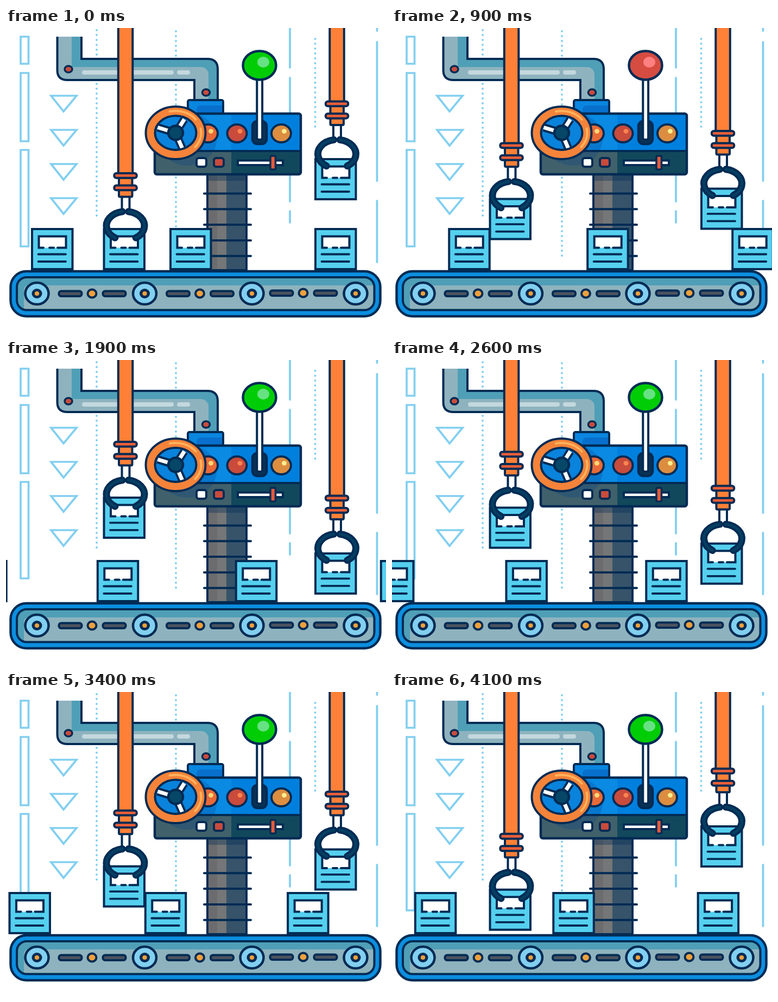
An HTML page with a canvas that plays this animation: 700 by 561 pixels, repeating every 4200 ms.

```html
<!DOCTYPE html>
<html lang="en">
<head>
<meta charset="utf-8">
<title>Conveyor machine</title>
<style>
html, body { margin: 0; width: 100%; height: 100%; overflow: hidden; background: #fff; }
canvas { display: block; }
</style>
</head>
<body>
<canvas id="stage" width="700" height="561"></canvas>
<script>
const ctx = document.getElementById('stage').getContext('2d');
const NAVY = '#012b54', SKY = '#82cff0', TEAL = '#4f9fb7', STEEL = '#8eb3be';
const ORANGE = '#ff8036', RED = '#c94b3c', BLUE = '#0080de', AMBER = '#f0a03c';
const LOOP = 4200, STEP = 100, HALF = 21;

function paint(fill, stroke, width = 4) {
  if (fill) { ctx.fillStyle = fill; ctx.fill(); }
  if (stroke) { ctx.strokeStyle = stroke; ctx.lineWidth = width; ctx.stroke(); }
}
function box(x, y, w, h, r, fill, stroke, width) {
  ctx.beginPath();
  ctx.roundRect(x, y, w, h, r);
  paint(fill, stroke, width);
}
function oval(x, y, rx, ry, fill, stroke, width) {
  ctx.beginPath();
  ctx.ellipse(x, y, rx, ry, 0, 0, Math.PI * 2);
  paint(fill, stroke, width);
}
function line(x1, y1, x2, y2, color, width, cap = 'round') {
  ctx.beginPath();
  ctx.moveTo(x1, y1);
  ctx.lineTo(x2, y2);
  ctx.lineCap = cap;
  paint(null, color, width);
}
function arc(x, y, rx, ry, from, to, color, width) {
  ctx.beginPath();
  ctx.ellipse(x, y, rx, ry, 0, from, to);
  ctx.lineCap = 'round';
  paint(null, color, width);
}

function drawBackdrop() {
  ctx.fillStyle = '#fff';
  ctx.fillRect(0, 0, 700, 561);
  for (const [y, h] of [[16, 50], [83, 126], [225, 178]]) box(27, y, 14.5, h, 0, null, SKY, 3.7);
  for (let y = 125; y < 320; y += 63) {
    ctx.beginPath();
    ctx.moveTo(83, y);
    ctx.lineTo(130, y);
    ctx.lineTo(106, y + 29);
    ctx.closePath();
    paint(null, SKY, 3.7);
  }
  for (const [x, top, bottom] of [[167, 4, 347], [313, 6, 424], [569.5, 20, 183]]) {
    for (let y = top; y < bottom; y += 9) oval(x, y, 2, 2, SKY);
  }
  for (const [x, a, b] of [[523, 0, 73], [523, 92, 320], [523, 338, 359],
    [683.5, 0, 5], [683.5, 26, 282], [683.5, 319, 432]]) line(x, a, x, b, SKY, 3.8);
}

function pipePath() {
  ctx.beginPath();
  ctx.moveTo(94.5, 16);
  ctx.lineTo(94.5, 78);
  ctx.quadraticCurveTo(94.5, 96, 113, 96);
  ctx.lineTo(347, 96);
  ctx.lineTo(347, 134);
  ctx.lineTo(390, 134);
  ctx.lineTo(390, 76);
  ctx.quadraticCurveTo(390, 57, 371, 57);
  ctx.lineTo(139, 57);
  ctx.lineTo(139, 16);
}

function drawPipe() {
  ctx.save();
  pipePath();
  ctx.clip();
  ctx.fillStyle = TEAL;
  ctx.fillRect(90, 10, 304, 130);
  box(90, 10, 31, 100, 0, STEEL);
  box(90, 72, 283, 80, [0, 14, 0, 0], STEEL);
  ctx.restore();
  pipePath();
  ctx.lineCap = 'butt';
  paint(null, NAVY, 4);
  line(144, 82, 305, 82, '#c3d8de', 8);
  line(319, 82, 335, 82, '#c3d8de', 8);
  oval(115, 76, 7, 6, RED, NAVY, 3.5);
  oval(368.5, 119, 7, 6, RED, NAVY, 3.5);
}

function drawPost() {
  box(371, 268, 72, 179, 0, '#6c6c6e');
  box(389, 268, 17, 179, 0, '#747677');
  box(406, 268, 37, 179, 0, '#36536a');
  box(371, 268, 72, 14, 0, 'rgba(1,43,84,.35)');
  box(371, 268, 72, 179, 0, null, NAVY);
  for (let i = 0; i < 5; i++) line(365, 305.5 + 28.8 * i, 451, 305.5 + 28.8 * i, NAVY, 4);
}

function lamp(x, color, glow) {
  oval(x, 194.5, 18, 16.5, color, NAVY, 4);
  oval(x + 5.5, 190.5, 4.5, 4.2, glow);
}

function drawPanel() {
  box(335, 133, 65, 27, 3, '#0a86e0');
  box(351, 143, 49, 17, [8, 0, 0, 0], '#0870cc');
  box(335, 133, 65, 27, 3, null, NAVY);

  box(274, 158, 269, 112, 4, BLUE);
  box(274, 158, 141, 70, 0, '#0a8ae2');
  box(274, 227, 269, 43, [0, 0, 4, 4], '#12485c');
  box(274, 227, 141, 43, [0, 0, 0, 4], '#40616b');
  ctx.save();
  ctx.beginPath();
  ctx.rect(274, 158, 269, 112);
  ctx.clip();
  oval(334, 205, 54, 49, 'rgba(0,60,140,.25)');
  ctx.restore();
  box(274, 158, 269, 112, 4, null, NAVY, 4.5);
  line(274, 227, 543, 227, NAVY, 4);

  lamp(372, '#e96a38', '#ffd873');
  lamp(425.5, RED, '#ff8450');
  lamp(507, '#dc8d40', '#fff08c');

  box(351, 240, 18, 16, 4, '#fff', NAVY);
  box(383, 240, 18, 16, 4, RED, NAVY);
  box(427, 244.5, 83, 8.5, 0, '#fff', NAVY);
  box(487, 236, 9.5, 25, 2, '#e25a3c', NAVY, 3.5);
}

function drawLever(red) {
  box(454, 172, 26, 42, 9, '#0a3252', NAVY, 4.5);
  box(462.3, 92, 9.8, 114, 3, '#fff', NAVY, 4);
  oval(467, 69, 30.5, 26.5, red ? '#d64c41' : '#00cd05', NAVY, 4.5);
  oval(474, 63, 11, 10, red ? '#ff8080' : '#66e183');
}

function drawWheel() {
  const x = 312.5, y = 193.5;
  oval(x, y, 38, 32, '#0a83dc');
  for (const [dx, dy] of [[-33, -10], [16, -25], [12, 28]]) {
    line(x, y, x + dx, y + dy, NAVY, 15, 'butt');
    line(x, y, x + dx, y + dy, '#fff', 7, 'butt');
  }
  oval(x, y, 46.5, 40, null, NAVY, 21);
  oval(x, y, 46.5, 40, null, '#f5833a', 13);
  arc(x, y, 47, 40.5, -1.8, -0.65, '#ffb35c', 4);
  arc(x, y, 47, 40.5, -0.2, 0.7, '#ffb35c', 4);
  oval(x, y, 13.5, 13, '#064768', NAVY, 4.5);
}

function drawBelt() {
  box(8.5, 449, 681, 83, 29, '#0c8fe0', NAVY, 4.5);
  ctx.save();
  ctx.beginPath();
  ctx.roundRect(20, 460, 658.5, 60.5, 18);
  ctx.clip();
  ctx.fillStyle = TEAL;
  ctx.fillRect(20, 460, 660, 61);
  box(33, 475, 660, 60, [8, 0, 0, 0], STEEL);
  ctx.restore();
  box(20, 460, 658.5, 60.5, 18, null, NAVY, 4);
  for (const x of [57, 255.5, 453, 644]) {
    oval(x, 490, 21.5, 20, SKY, NAVY, 4.5);
    oval(x, 490, 9.5, 9, NAVY);
    oval(x, 490, 4.2, 4, AMBER);
  }
  for (const [x, y] of [[158.5, 490], [357, 490], [547.5, 489]]) {
    box(x - 61, y - 4.5, 42, 9.5, 4, '#4c535f', NAVY);
    box(x + 20, y - 4.5, 42, 9.5, 4, '#4c535f', NAVY);
    oval(x, y, 8, 7.5, AMBER, NAVY, 4);
  }
}

function drawCrate(x, y) {
  ctx.save();
  ctx.translate(x, y);
  box(0, 0, 74.5, 74, 0, '#55d0ee', NAVY, 4);
  box(12.5, 13.5, 50, 21, 0, '#fff');
  ctx.beginPath();
  ctx.moveTo(21, 34.5);
  ctx.lineTo(12.5, 34.5);
  ctx.lineTo(12.5, 13.5);
  ctx.lineTo(62.5, 13.5);
  ctx.lineTo(62.5, 34.5);
  ctx.lineTo(47, 34.5);
  ctx.lineCap = 'round';
  paint(null, NAVY, 4);
  line(32, 34.5, 40, 34.5, NAVY, 4);
  line(11.5, 46.5, 62, 46.5, NAVY, 3.8);
  line(11.5, 60, 62, 60, NAVY, 3.8);
  ctx.restore();
}

// The origin is the middle of the arm, level with the top of the held crate.
function drawArm(x, y, lift) {
  drawCrate(x - 39.5, y);
  ctx.save();
  ctx.translate(x, y - lift);
  box(-6.5, -62, 14, 30, 0, '#fff', NAVY, 4);
  box(-12, -76, 24.5, 16.5, 2, ORANGE, NAVY, 4);
  box(-13.2, -520, 26.5, 418, 0, ORANGE, NAVY, 4);
  box(-12, -98, 24.5, 22, 0, ORANGE, NAVY, 4);
  for (const top of [-103, -80.5]) box(-20.7, top, 41.5, 8.8, 4, '#ea5e38', NAVY, 4);
  for (const [color, width] of [[NAVY, 13], ['#053f62', 5]]) {
    arc(0, -6, 35, 26.5, 2.15, 4.55, color, width);
    arc(0, -6, 35, 26.5, -1.41, 0.99, color, width);
  }
  ctx.restore();
}

function draw(time) {
  const n = Math.floor((time % LOOP) / STEP);
  const swing = n <= HALF ? n : 2 * HALF - n;
  const early = Math.min(n - HALF, 0), late = Math.max(n - HALF, 0);
  const fast = 267 / 42;

  drawBackdrop();
  drawPipe();
  drawPost();
  drawPanel();
  drawLever(n >= 2 && n < 16);
  drawWheel();
  drawBelt();
  drawCrate(-61 + early * 6.4 + late * 5.19, 371);
  drawCrate(181.5 + early * fast + late * 5.79, 371);
  drawCrate(303 + n * fast, 371);
  drawCrate(570 + n * fast, 371);
  drawArm(220, 371 - swing * 6.16, 0);
  drawArm(609.5, 242 + swing * 6.05, 3.5);
}

function tick() {
  draw(performance.now());
  requestAnimationFrame(tick);
}
tick();
</script>
</body>
</html>
```
